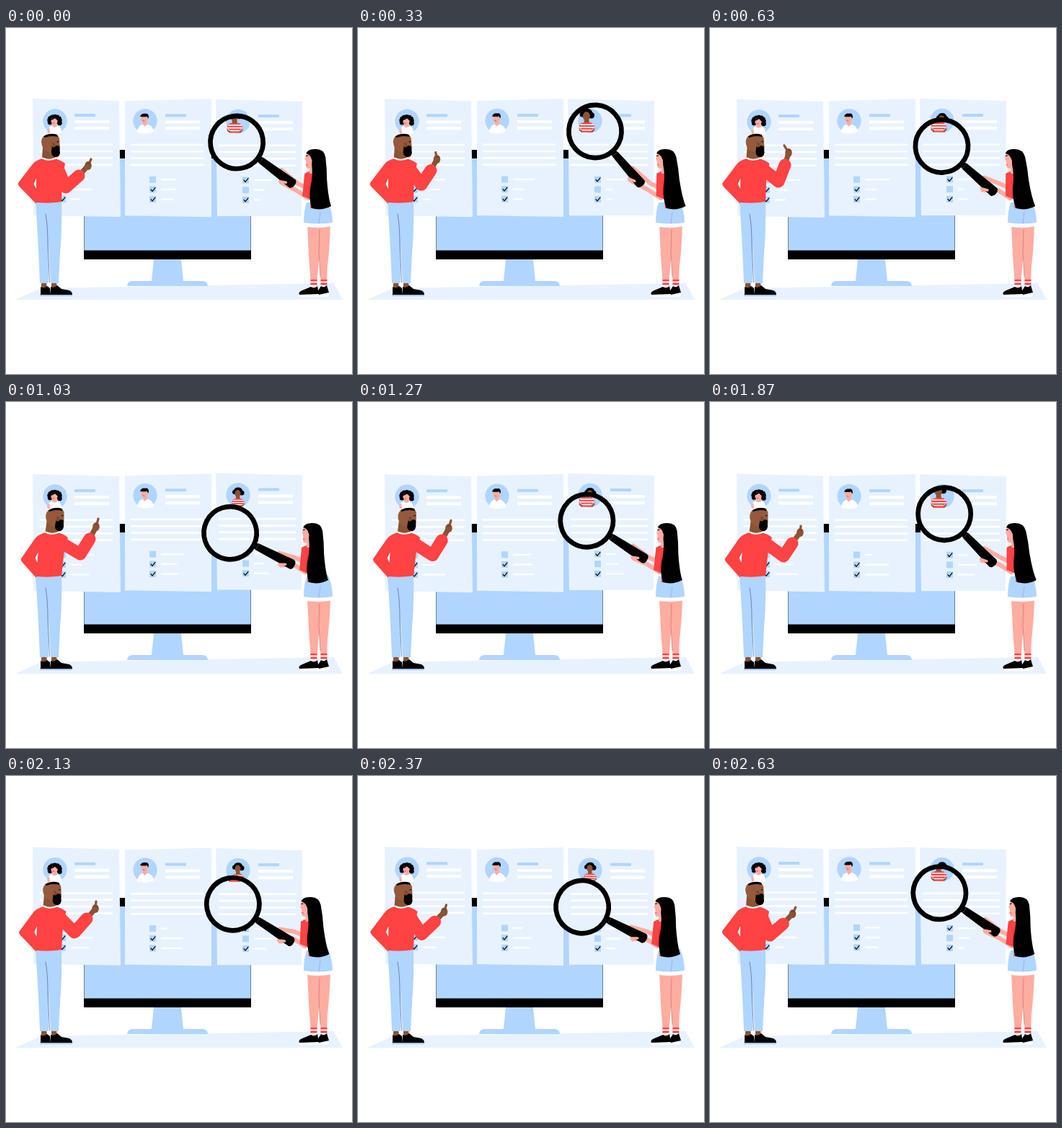
Write an HTML page with a canvas that moves like this. It is 480 px wide and 480 px high and loops after 2670 ms.

```html
<!DOCTYPE html>
<html lang="en">
<head>
<meta charset="utf-8">
<title>Reviewing candidates</title>
<style>
html, body { margin: 0; width: 100%; height: 100%; overflow: hidden; background: #fff; }
canvas { display: block; width: 480px; height: 480px; }
</style>
</head>
<body>
<canvas id="stage" width="480" height="480"></canvas>
<script>
const ctx = document.getElementById('stage').getContext('2d');
const LOOP = 2670;
const PALE = '#e8f2ff', BLUE = '#b0d5ff', RED = '#ff4242', SKIN = '#ffaca1', BROWN = '#8b5233', BLACK = '#000', WHITE = '#fff';

const wave = (t, peak, cycles = 1) => Math.cos(2 * Math.PI * cycles * (t - peak) / LOOP);

function fill(path, color) {
  ctx.fillStyle = color;
  ctx.fill(new Path2D(path));
}
function line(path, color, width) {
  ctx.strokeStyle = color;
  ctx.lineWidth = width;
  ctx.lineCap = ctx.lineJoin = 'round';
  ctx.stroke(new Path2D(path));
}
function rect(x, y, w, h, color) {
  ctx.fillStyle = color;
  ctx.fillRect(x, y, w, h);
}
function disc(x, y, rx, color, ry = rx) {
  ctx.fillStyle = color;
  ctx.beginPath();
  ctx.ellipse(x, y, rx, ry, 0, 0, 7);
  ctx.fill();
}
function group(draw) {
  ctx.save();
  draw();
  ctx.restore();
}
// Shifts everything at height y by `base`, growing by `slope` per pixel above it.
const lean = (y, base, slope) => ctx.transform(1, 0, -slope, 1, base + slope * y, 0);

// Avatars are drawn around the centre of their disc.
function curlyWoman() {
  for (let i = 0; i < 9; i++) {
    const a = Math.PI * (0.85 + i * 0.165);
    disc(-.5 + 7 * Math.cos(a), -1 + 5 * Math.sin(a), 3.2, BLACK);
  }
  disc(-7, 2, 3.2, BLACK);
  disc(6.5, 3, 3.2, BLACK);
  fill('M-10 17Q-11 8-5 7L4 7Q9 8 9 17Q0 20-10 17Z', WHITE);
  fill('M-10 17L-11 13L-8 9L-7 17ZM-3 3L2 3L3 7L-1 9L-4 7Z', SKIN);
  disc(-1, 0, 4.6, SKIN, 5.3);
  fill('M-6-1Q-4-6 3-6L5 0Q1-2 0-4Q-2-2-6-1Z', BLACK);
  line('M-3 2.5L-1 3', RED, 1);
}
function shirtMan() {
  fill('M-11 16Q-10 7-4 5L4 5Q11 7 12 15Q2 20-11 16Z', WHITE);
  fill('M-3 0L2 0L3 5L-1 8L-3 5Z', SKIN);
  disc(-1, -3, 4.6, SKIN, 5.8);
  fill('M-7-6Q-5-11 0-10Q5-11 5-5L4-3L3-6Q-2-5-7-6Z', BLACK);
  line('M-3 0L-1 .5', RED, 1);
  line('M-6 12L-6 16M7 11L6 16', PALE, .8);
}
function stripedWoman() {
  disc(0, -6, 6, BLACK, 4.5);
  disc(5, -3, 3.5, BLACK);
  disc(-5, -4, 3, BLACK);
  disc(-.5, -2, 4, BROWN, 5);
  fill('M-3 0L2 0L3 7L-3 7Z', BROWN);
  fill('M-9 12L-8 7Q-6 5-3 5L3 5Q8 5 9 12L6 12L6 16L-6 16L-6 12Z', RED);
  line('M-7 7.5L7 7.5M-8 10.5L8 10.5M-5 13.5L5 13.5', WHITE, 1.3);
  line('M-8 13L-6 15M8 13L6 15', BROWN, 1.5);
}

const papers = [
  { shape: 'M37 98L157 101L159 262L38 260Z', avatar: [68, 129], person: curlyWoman, bar: 95, text: [47, 148],
    box: 74, checked: [1, 2], low: 0, rows: [[24, 11, 700], [23, 8, 2400], [22, 12, 1580]] },
  { shape: 'M165 101L285 98L285 262L165 260Z', avatar: [193, 128.5], person: shirtMan, bar: 221, text: [173, 274],
    box: 199, checked: [1, 2], low: 330, rows: [[22, 13, 700], [24, 9, 1800], [24, 10, 1700]] },
  { shape: 'M291 98L411 101L410 260L293 260Z', avatar: [322, 128.5], person: stripedWoman, bar: 350, text: [295, 402],
    box: 328, checked: [0, 2], low: 650, rows: [[19, 7, 300], [17, 9, 1900], [17, 9, 1500]] }
];
const bob = (paper, t) => 1.1 - 1.1 * wave(t, paper.low);

function drawAvatar({ avatar: [x, y], person }, zoomed) {
  group(() => {
    ctx.translate(x, y);
    disc(0, 0, 16.7, BLUE);
    if (zoomed) {
      ctx.translate(-4.5, -4);
      ctx.scale(1.25, 1.25);
    }
    person();
  });
}
function drawTextLines({ text: [from, to] }) {
  for (let i = 0; i < 4; i++) rect(from, 160.5 + 9.3 * i, to - from, 2.5, WHITE);
}
function drawPaper(paper, t) {
  const { bar, box } = paper;
  group(() => {
    ctx.translate(0, bob(paper, t));
    fill(paper.shape, PALE);
    drawAvatar(paper);
    rect(bar, 119, 29, 4, BLUE);
    rect(bar, 128, 48, 4, WHITE);
    rect(bar, 137, 48, 4, WHITE);
    drawTextLines(paper);
    paper.rows.forEach(([mean, swing, peak], i) => {
      const y = 210 + 13.7 * i;
      rect(box, y - 4.5, 9, 9, BLUE);
      if (paper.checked.includes(i)) line(`M${box + 2} ${y}l2 2.5l4-5`, BLACK, 1.2);
      rect(box + 16, y - 1, mean + swing * wave(t, peak), 2, WHITE);
    });
  });
}

function drawDesk() {
  fill('M13 377L48 361L455 354L467 377Z', PALE);
  rect(108, 169, 232, 152, BLACK);
  rect(108.4, 181, 231.2, 127.5, BLUE);
  fill('M205 321L243 321L246 351L273 351Q280 352 280 358L168 358Q168 352 175 351L202 351Z', BLUE);
}

// time, lean, elbow x y, cuff x y, fist x y, fingertip x y
const poses = [
  [0, 0, 83, 221, 101, 205, 114, 191, 118, 182],
  [630, .1, 95, 213, 104, 190, 109, 173, 103, 163],
  [1030, 1, 103, 211, 116, 190, 125, 173, 128, 162],
  [1470, 1, 103, 214, 115, 194, 125, 177, 127, 167],
  [1870, 1, 102, 214, 114, 196, 125, 181, 126, 172],
  [2130, .35, 95, 217, 112, 198, 124, 184, 125, 174]
];
// Cyclic cubic interpolation between poses.
function poseAt(t) {
  const n = poses.length;
  const key = i => {
    const turn = Math.floor(i / n), [time, ...rest] = poses[i - turn * n];
    return [time + turn * LOOP, ...rest];
  };
  let i = n - 1;
  while (poses[i][0] > t) i--;
  const [a, b, c, d] = [-1, 0, 1, 2].map(k => key(i + k));
  const span = c[0] - b[0], u = (t - b[0]) / span;
  return b.slice(1).map((p, j) => {
    const k = j + 1, q = c[k];
    const m0 = (q - a[k]) / (c[0] - a[0]) * span, m1 = (d[k] - p) / (d[0] - b[0]) * span;
    return p + u * (m0 + u * (3 * (q - p) - 2 * m0 - m1 + u * (2 * (p - q) + m0 + m1)));
  });
}

function drawMan(t) {
  const [tilt, ex, ey, cx, cy, fx, fy, tx, ty] = poseAt(t);
  // legs and shoes
  fill('M49 352L56 352L57 361L49 361ZM63 352L70 352L71 361L63 361Z', BROWN);
  rect(47, 369, 45, 3, '#a5c8f0');
  fill('M48 359Q52 362 57 358L61 361L62 370L48 370Z', BLACK);
  fill('M62 359Q67 361 71 357L77 362L88 364Q92 366 92 370L62 370Z', BLACK);
  fill('M41 240L77 240Q78 280 75 312L73 354L62 354L59 300L59 354L47 354Q45 300 41 240Z', BLUE);
  line('M55 258Q58 275 58 300L60.5 353', '#53769c', .8);
  // torso and head
  group(() => {
    lean(243, 0, tilt * .072);
    const e = tilt * 2.2, drop = 2.5 + tilt * 2;
    fill(`M50 181Q40 184 36 190L${18 + e} ${211 + drop}Q${15 + e} ${214 + drop} ${19 + e} ${218 + drop}L42 244L42 224L38 217L42 207L42 242Q60 244 77 241L78 210L82 188Q76 183 67 181Z`, RED);
    line('M42 207L38 216L42 224', '#b92c30', .7);
    fill('M51 165L50 180Q58 185 68 181L68 166Z', BROWN);
    line('M50.5 180.5Q58 184.5 68 181', WHITE, 2);
    fill('M49 157Q50 148 60 147Q72 146 74 153L75 168Q70 176 58 172Q49 168 49 157Z', '#955a3b');
    fill('M52 150.5Q61 144.5 71 148L72 151Q62 148.5 54 152Z', BLACK);
    fill('M64 163Q67 166 70 163L74 164L75 173Q74 180 68 179Q62 177 63 170Z', BLACK);
    disc(66, 162, 2.6, BROWN, 3.4);
    line('M65 160Q68 160 67 164', '#57301d', .8);
    line('M71 158L73 157.5', BLACK, 1);
  });
  // pointing arm
  line(`M${cx} ${cy}L${fx} ${fy}`, BROWN, 7);
  disc(fx, fy, 4.8, BROWN, 6);
  line(`M${fx} ${fy}L${tx} ${ty}`, BROWN, 3.2);
  line(`M${fx - 1} ${fy - 4}l4 1`, '#57301d', .7);
  line(`M${72 + tilt * 4} 195L${ex} ${ey}L${cx} ${cy}`, RED, 17);
}

function drawLens(t, x, y, angle) {
  const paper = papers[2];
  group(() => {
    ctx.beginPath();
    ctx.arc(x, y, 37, 0, 7);
    ctx.clip();
    rect(x - 40, y - 40, 80, 80, PALE);
    ctx.translate(0, bob(paper, t));
    drawTextLines(paper);
    drawAvatar(paper, true);
  });
  group(() => {
    ctx.translate(x, y);
    ctx.rotate(angle);
    ctx.strokeStyle = BLACK;
    ctx.lineWidth = 6.7;
    ctx.beginPath();
    ctx.arc(0, 0, 36.6, 0, 7);
    ctx.stroke();
    fill('M38-4L43-5L96-7Q100-6 100 0Q100 6 96 7L43 5L38 4Z', BLACK);
    line('M42-4L42 4', '#555', .6);
  });
}

function drawGirl(t) {
  const head = 3.5 * wave(t, 80, 2) - 3, base = -4 * wave(t, 1000, 2);
  const shift = (head + base) / 2;
  const x = 320 - 9 * wave(t, 1000, 2);
  const y = 163 + 20 * wave(t, 955, 2);
  const angle = (38 - 11 * wave(t, 1030, 2)) * Math.PI / 180;
  // A point `d` along the handle, `side` pixels below its axis.
  const grip = (d, side) => {
    const c = Math.cos(angle), s = Math.sin(angle);
    return `${x + d * c - side * s} ${y + d * s + side * c}`;
  };
  // legs, socks and shoes
  fill('M418 274L436 274L435 310L431 357L423 357L420 315ZM434 274L450 274Q449 305 446 330L445 357L437 357L434 315Z', SKIN);
  line('M435 280L434 310L436 345', '#c9706b', .7);
  for (const sockX of [422.5, 436.5]) {
    rect(sockX, 348, 9, 12, WHITE);
    rect(sockX, 348.5, 9, 3, RED);
    rect(sockX, 353.5, 9, 3, RED);
  }
  fill('M406 369L434 368L434 373L408 373ZM433 368L448 367L448 372L435 373Z', WHITE);
  fill('M423 359Q428 362 432 358L434 369L407 370Q405 366 411 364Z', BLACK);
  fill('M437 358Q441 361 445 357L448 367L434 370L432 366Z', BLACK);
  // shorts
  fill('M414 269L453 269L453 275Q432 279 412 275Z', WHITE);
  fill('M417 242L447 240Q453 256 453 270Q433 273 413 270Q413 254 417 242Z', BLUE);
  line('M436 256L434 271', '#84acd8', .7);
  // arms around the handle
  line(`M${grip(73, -6)}L${405 + shift} 216L${418 + shift} 222`, SKIN, 6);
  line(`M${grip(83, 8)}L${402 + shift} 225L${419 + shift} 236`, SKIN, 6);
  drawLens(t, x, y, angle);
  line(`M${grip(80, 8)}L${grip(88, 4)}`, SKIN, 3.5);
  // shirt, face and hair
  group(() => {
    lean(252, base, (head - base) / 75);
    fill('M414 202Q420 198 428 198L441 199L445 214L441 250L422 250L423 238L411 233Z', RED);
    line('M422 212L420 236', '#c22f34', .7);
    fill('M419 170L416 176L414.5 182L416 185L416 193Q417 196 421 195L421 202L428 202L428 172Z', SKIN);
    line('M416 177.5L418.5 177', BLACK, 1);
    line('M416 190L418 190', RED, 1);
    fill('M416 174Q419 167 430 168Q441 168 443 179Q445 195 445 210Q447 236 451 247Q438 254 424 250Q420 238 422 222Q426 204 424 190Q425 176 416 174Z', BLACK);
    disc(422, 184.5, 2.2, SKIN, 3);
  });
}

function frame(now) {
  const t = now % LOOP;
  ctx.clearRect(0, 0, 480, 480);
  drawDesk();
  papers.forEach(paper => drawPaper(paper, t));
  drawMan(t);
  drawGirl(t);
  requestAnimationFrame(frame);
}
requestAnimationFrame(frame);
</script>
</body>
</html>
```
